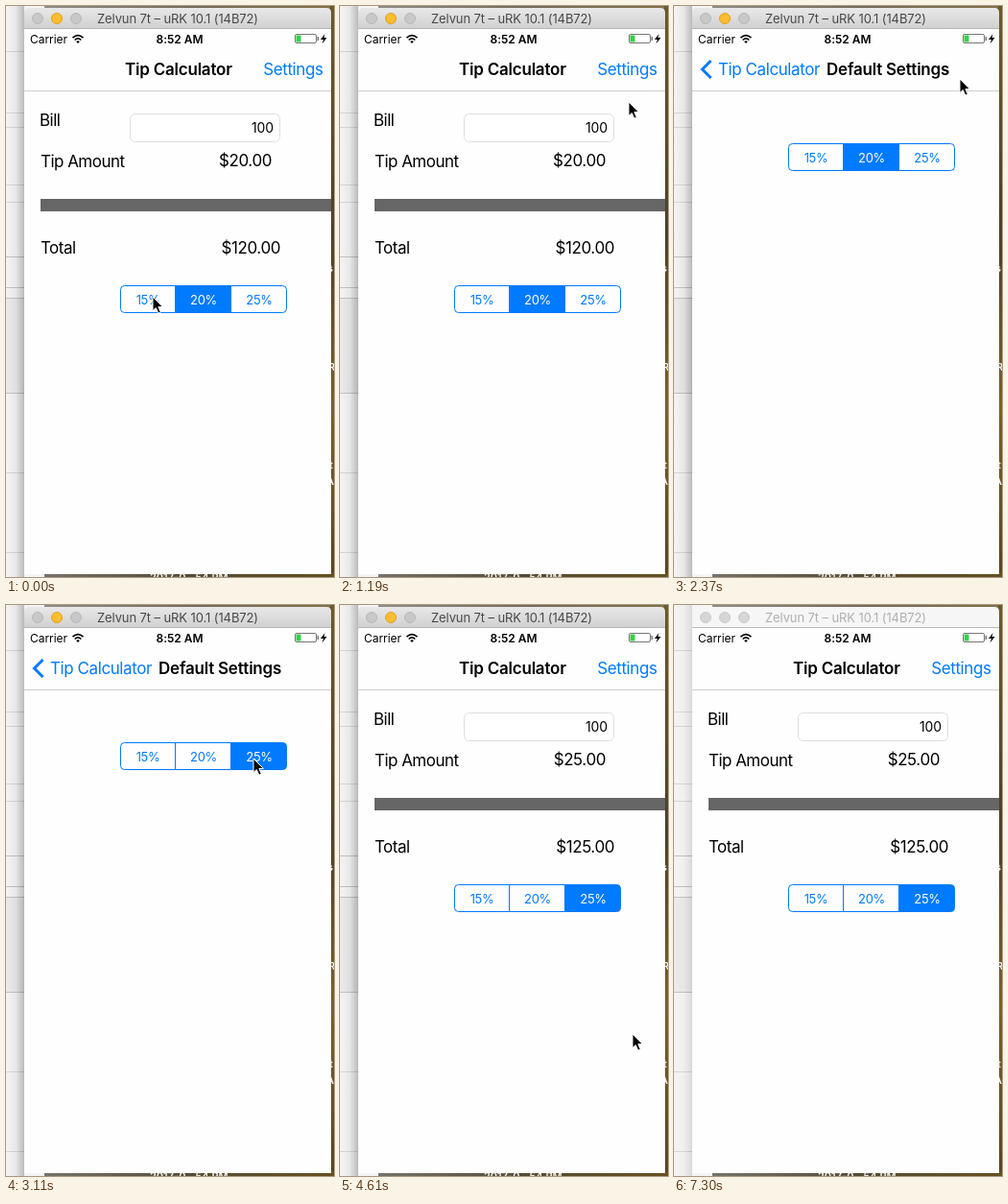
Recreate the animation shown at these times as an HTML page. Size 342 px wide and 595 px high, loop 7.4 s.

```html
<!DOCTYPE html>
<html lang="en">
<head>
<meta charset="utf-8">
<title>Tip calculator demo</title>
<style>
  html, body { margin: 0; width: 100%; height: 100%; overflow: hidden; background: #fff; }
  svg { display: block; width: 342px; height: 595px; }
  text { font-family: Inter, Roboto, "Liberation Sans", sans-serif; white-space: pre; }
  .body { font-size: 17px; letter-spacing: -.53px; }
  .nav { font-size: 17px; letter-spacing: -.42px; }
  .bold { font-weight: 600; }
  .nav.bold { letter-spacing: -.22px; }
  .blue { fill: #007aff; }
  .end { text-anchor: end; }
  .mid { text-anchor: middle; }
  .seg { font-size: 13px; text-anchor: middle; letter-spacing: -.35px; }
  .status { font-size: 12px; letter-spacing: -.05px; }
  .desk { font-size: 11px; font-weight: 600; fill: #f4f4f0; }
</style>
</head>
<body>
<svg viewBox="0 0 342 595">
  <defs>
    <linearGradient id="side">
      <stop offset="0" stop-color="#000" stop-opacity="0"/>
      <stop offset=".55" stop-color="#000" stop-opacity=".06"/>
      <stop offset="1" stop-color="#000" stop-opacity=".24"/>
    </linearGradient>
    <linearGradient id="wood" x2="0" y2="1">
      <stop offset="0" stop-color="#6b5a2c"/>
      <stop offset=".4" stop-color="#4c4028"/>
      <stop offset=".7" stop-color="#7a622c"/>
      <stop offset="1" stop-color="#574522"/>
    </linearGradient>
    <linearGradient id="floor">
      <stop offset="0" stop-color="#77736c"/>
      <stop offset=".5" stop-color="#554b35"/>
      <stop offset="1" stop-color="#66501f"/>
    </linearGradient>
    <linearGradient id="chrome" x2="0" y2="1">
      <stop offset="0" stop-color="#e9e8e9"/>
      <stop offset="1" stop-color="#d1d0d1"/>
    </linearGradient>
    <linearGradient id="edge">
      <stop offset="0" stop-color="#000" stop-opacity="0"/>
      <stop offset="1" stop-color="#000" stop-opacity=".1"/>
    </linearGradient>
    <clipPath id="screen"><rect x="19" y="89" width="320" height="503"/></clipPath>
    <clipPath id="titleClip"><rect x="19" y="50" width="294" height="38"/></clipPath>
    <clipPath id="barClip"><rect x="19" y="24" width="320" height="65"/></clipPath>
  </defs>

  <rect width="342" height="595" fill="#f5f5f5"/>
  <rect y="304" width="19" height="99" fill="#ececec"/>
  <g id="rules"></g>
  <rect id="shade" width="19" height="595" fill="url(#side)"/>
  <rect x="40" width="302" height="4" fill="url(#floor)" opacity=".8"/>
  <rect x="338" width="4" height="595" fill="url(#wood)"/>
  <rect x="40" y="590" width="302" height="5" fill="url(#floor)"/>
  <g class="desk">
    <text x="335" y="277">s</text>
    <text x="336" y="380">R</text>
    <text x="337" y="482">t</text>
    <text x="334" y="499">A</text>
    <text x="150" y="599">2017-0...54 PM</text>
  </g>

  <path id="chromeBar" d="M19 24V7q0-5 5-5H334q5 0 5 5V24z"/>
  <path d="M19 23.5H339" stroke="#b9b8b9"/>
  <g id="lights"></g>
  <text id="caption" class="mid" x="179" y="18" font-size="13" letter-spacing="-.1">Zelvun 7t – uRK 10.1 (14B72)</text>
  <rect x="19" y="24" width="320" height="568" fill="#fefefe"/>

  <g clip-path="url(#screen)">
    <g id="main">
      <text class="body" x="35" y="125">Bill</text>
      <rect x="129.5" y="112.5" width="156" height="29" rx="5" fill="#fff" stroke="#dedede"/>
      <text class="end" x="279" y="132" font-size="14" letter-spacing="-.15">100</text>
      <text class="body" x="36" y="167.5">Tip Amount</text>
      <text id="tip" class="nav end" x="277" y="166.5"></text>
      <rect x="36" y="201" width="340" height="13" fill="#666"/>
      <text class="body" x="36" y="257.5">Total</text>
      <text id="total" class="nav end" x="286" y="257.5"></text>
      <g id="mainPicker"></g>
    </g>
    <rect id="dim" x="19" y="89" width="320" height="503"/>
    <g id="detail">
      <rect x="14" y="89" width="5" height="503" fill="url(#edge)"/>
      <rect x="19" y="89" width="320" height="503" fill="#fefefe"/>
      <g id="detailPicker" transform="translate(0 -148)"></g>
    </g>
  </g>

  <g clip-path="url(#barClip)">
    <rect id="barTint" x="19" y="24" height="64"/>
    <text id="title" class="nav bold" y="72">Tip Calculator</text>
    <text id="settings" class="nav blue end" x="330.5" y="72">Settings</text>
    <path id="chevron" d="M38.5 57L29.5 66L38.5 75" fill="none" stroke="#007aff" stroke-width="3"/>
    <text id="back" class="nav blue" y="72">Tip Calculator</text>
    <g clip-path="url(#titleClip)">
      <text id="detailTitle" class="nav bold" y="72">Default Settings</text>
    </g>
    <path d="M19 88.5H339" stroke="#cfcfcf"/>
  </g>

  <text class="status" x="25" y="38.5">Carrier</text>
  <g fill="none" stroke="#000" stroke-width="1.7">
    <path d="M69.5 33.2Q75 28.2 80.5 33.2M71.7 35.5Q75 32.4 78.3 35.5"/>
    <path d="M73.2 37L75 38.9L76.8 37Q75 35.5 73.2 37z" fill="#000" stroke="none"/>
  </g>
  <text class="status bold mid" x="181" y="38.5">8:52 AM</text>
  <rect x="301.5" y="29.5" width="22" height="9" rx="1.5" fill="#fff" stroke="#777"/>
  <rect x="302.5" y="30.5" width="5" height="7" fill="#35d04b"/>
  <rect x="324.5" y="32" width="1.5" height="4" fill="#777"/>
  <path d="M332.5 29L328 35H331L329.5 39.5L334.5 33H331.5z"/>

  <path id="cursor" d="M0 0V14.5L3.3 11.5L5.8 17.2L8.3 16.1L5.9 10.5H10.4z" stroke="#fff" stroke-linejoin="round"/>
</svg>
<script>
const LOOP = 7400, STEP = 148.1, LEAVE = 6110, BLUR = 7300;
const PUSH = 1725, POP = 3724, SETTLED = 29;
const RATES = [15, 20, 25], DIVIDERS = [119.5, 176.5, 234.5, 292.5];
const cursorPath = [
  [0, 153, 303], [1, 152, 304], [2, 165, 306], [4, 206, 305], [5, 207, 303],
  [6, 235, 240], [7, 280, 150], [8, 301, 100], [9, 303, 80], [10, 305, 70],
  [13, 313, 68], [16, 298, 76], [18, 270, 150], [20, 261, 162], [21, 258, 160],
  [24, 125, 60], [26, 125, 60], [28, 200, 200], [30, 290, 400], [31, 305, 447],
  [32, 315, 510], [33, 320, 570], [34, 320, 620]
];

const el = {};
document.querySelectorAll("svg [id]").forEach(node => el[node.id] = node);
const set = (node, attrs) => {
  for (const key in attrs) node.setAttribute(key, attrs[key]);
  return node;
};
const add = (parent, name, attrs) =>
  parent.appendChild(set(document.createElementNS("http://www.w3.org/2000/svg", name), attrs));

for (const y of [47, 111, 126, 186, 204, 261, 293, 304, 403, 486, 569])
  add(el.rules, "path", { d: `M0 ${y + .5}H19`, stroke: y > 250 && y < 410 ? "#c4c4c4" : "#d8d8d8" });

const lights = [33, 53, 73].map(cx => add(el.lights, "circle", { cx, cy: 13, r: 5.5 }));

function makePicker(parent) {
  const cells = RATES.map((rate, i) => {
    const left = DIVIDERS[i], right = DIVIDERS[i + 1];
    const d = i === 0 ? `M${right} 291.5H${left + 4}q-4 0-4 4V315.5q0 4 4 4H${right}z`
      : i === 2 ? `M${left} 291.5H${right - 4}q4 0 4 4V315.5q0 4-4 4H${left}z`
      : `M${left} 291.5H${right}V319.5H${left}z`;
    const box = add(parent, "path", { d, stroke: "#007aff" });
    const label = add(parent, "text", { class: "seg", x: 148 + i * 58, y: 310.5 });
    label.textContent = rate + "%";
    return { box, label };
  });
  return rate => cells.forEach(({ box, label }, i) => {
    const on = RATES[i] === rate;
    set(box, { fill: on ? "#007aff" : "none" });
    set(label, { fill: on ? "#fff" : "#007aff" });
  });
}
const pickMain = makePicker(el.mainPicker);
const pickDetail = makePicker(el.detailPicker);

function spring(ms) {
  const a = Math.max(0, ms) * .01826;
  const value = 1 - (1 + a) * Math.exp(-a);
  return value > .998 ? 1 : value;
}

function cursorAt(step) {
  const next = Math.max(1, cursorPath.findIndex(key => key[0] >= step));
  const [s0, x0, y0] = cursorPath[next - 1], [s1, x1, y1] = cursorPath[next];
  const k = (step - s0) / (s1 - s0);
  return [x0 + (x1 - x0) * k, y0 + (y1 - y0) * k];
}

// Bar buttons dip quickly and only return near the end of a transition.
const buttonFade = k => k ** 14 + .4 * k * (1 - k);

const shift = x => `translate(${Math.round(x)} 0)`;

function drawScreens(p) {
  set(el.main, { transform: shift(-96 * p) });
  set(el.dim, { opacity: .105 * p });
  set(el.detail, { transform: shift(320 * (1 - p)), visibility: p ? "visible" : "hidden" });
}

function drawNav(p, step) {
  const q = p - .35 * p ** 4 * (1 - p), rest = 1 - q;
  const x = 46 + 78 * rest;
  set(el.barTint, { width: 320 * (1 - p) + 4 * p, opacity: .035 * p * (p < 1) });
  set(el.title, { x, opacity: rest ** 5 });
  set(el.back, { x, opacity: step === 25 ? .2 : buttonFade(q) });
  set(el.chevron, { opacity: step === 25 ? .2 : buttonFade(q) });
  set(el.settings, { opacity: step === 11 ? .2 : buttonFade(rest) });
  set(el.detailTitle, { x: 159 + 168 * rest, opacity: q });
}

function drawWindow(active) {
  set(el.chromeBar, { fill: active ? "url(#chrome)" : "#f6f6f6" });
  set(el.caption, { fill: active ? "#484848" : "#b0b0b0" });
  set(el.shade, { opacity: active ? 1 : .45 });
  lights.forEach((light, i) => {
    const amber = active && i === 1;
    set(light, {
      fill: amber ? "#fdbd2f" : active ? "#c9c8c9" : "#d6d6d6",
      stroke: amber ? "#dfa123" : active ? "#b9b8b9" : "#cacaca"
    });
  });
}

function render(t) {
  const step = t < LEAVE
    ? Math.min(31, Math.floor(t / STEP))
    : Math.min(34, 32 + Math.floor((t - LEAVE) / 150));
  const time = step * STEP;
  const p = time < POP ? spring(time - PUSH) : 1 - spring(time - POP);
  const rate = step > 0 && step < 4 ? 15 : step < 20 ? 20 : 25;
  const tip = rate === 25 && step < SETTLED ? 20 : rate;

  pickMain(rate);
  pickDetail(rate);
  el.tip.textContent = `$${tip}.00`;
  el.total.textContent = `$${100 + tip}.00`;
  drawScreens(p);
  drawNav(p, step);
  drawWindow(t < BLUR);
  set(el.cursor, { transform: `translate(${cursorAt(step)})` });
}

const start = performance.now();
function tick() {
  render((performance.now() - start) % LOOP);
  requestAnimationFrame(tick);
}
tick();
</script>
</body>
</html>
```
